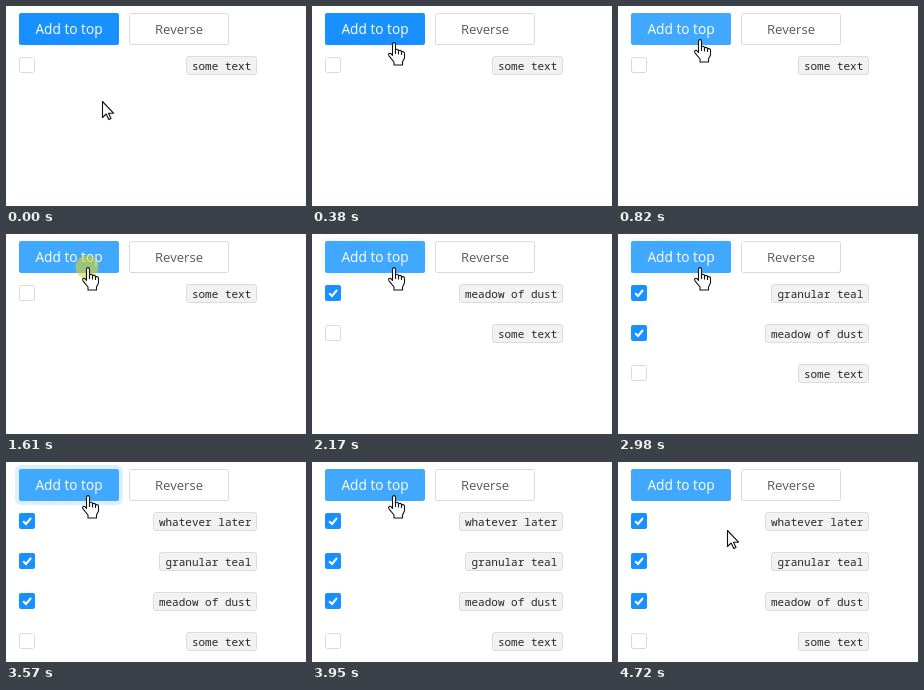
Write an HTML page that moves like this. It is 300 px wide and 200 px high and loops after 4.74 s.

```html
<!DOCTYPE html>
<html lang="en">
<head>
<meta charset="utf-8">
<title>List with add button</title>
<style>
  html, body { margin: 0; width: 100%; height: 100%; overflow: hidden; background: #fff; }
  svg { display: block; width: 100vw; height: 100vh; }
  .label { font-family: "Open Sans", "Noto Sans", sans-serif; text-anchor: middle; }
  .tag { font: 11px "Noto Sans Mono", "DejaVu Sans Mono", monospace; text-anchor: end; fill: #262626; }
  .cursor { fill: #fff; stroke: #111; stroke-width: 1.1; stroke-linejoin: round; }
</style>
</head>
<body>
<svg viewBox="0 0 300 200">
  <rect id="wave" fill="none" stroke="#1890ff"/>
  <rect id="add" x="13" y="7" width="100" height="32" rx="2"/>
  <text class="label" x="63" y="28" font-size="13.7" fill="#fff">Add to top</text>
  <rect x="123.5" y="7.5" width="99" height="31" rx="2" fill="#fff" stroke="#d9d9d9"/>
  <text class="label" x="173" y="28" font-size="13.1" fill="#595959">Reverse</text>
  <g id="rows"></g>
  <circle id="press" cx="81" cy="33" r="11.5" fill="#d7d728" fill-opacity=".6"/>
  <path id="arrow" class="cursor" d="M.5.5V16.5L4.2 13 6.8 18.6 9 17.6 6.5 12.2H11.5Z"/>
  <g id="hand" class="cursor">
    <path d="M4.5 13.5V2.5C4.5 0 7.5 0 7.5 2.5V8.5C7.5 6.8 10.5 6.8 10.5 8.8V9.5C10.5 7.9 13.5 7.9 13.5 9.8V10.5C13.5 9.2 16.5 9.2 16.5 11.2V16L14.5 20V23H6V20L1 13.8C-.3 12 1.8 10.2 3.2 11.8Z"/>
    <path d="M7.5 8V12M10.5 9V12.5M13.5 10V13" fill="none"/>
  </g>
</svg>
<script>
const LOOP = 4740;
const TEXTS = ["some text", "meadow of dust", "granular teal", "whatever later"];
// One entry per click: press, release, ring fully grown, ring faded, remaining ring opacity
const CLICKS = [
  [1610, 1740, 1870, 2170, .04],
  [2480, 2600, 2710, 2980, .04],
  [3390, 3490, 3570, 3950, 0],
];
const $ = id => document.getElementById(id);
const clamp = v => Math.min(1, Math.max(0, v));
const mix = (a, b, p) => a + (b - a) * p;

function set(el, attrs) {
  for (const key in attrs) el.setAttribute(key, attrs[key]);
}

$("rows").innerHTML = TEXTS.map((text, i) => {
  const w = Math.ceil(text.length * 6.6 + 11.5);
  const box = i
    ? `<rect x="13" y="51" width="16" height="16" rx="2" fill="#1890ff"/>
       <path d="M17.2 59.2 20 62 25 56" fill="none" stroke="#fff" stroke-width="2"/>`
    : `<rect x="13.5" y="51.5" width="15" height="15" rx="2" fill="#fff" stroke="#d9d9d9"/>`;
  return `<g>${box}
    <rect x="${251.5 - w}" y="50.5" width="${w - 1}" height="18" rx="2.5" fill="#f2f2f2" stroke="#dcdcdc"/>
    <text class="tag" x="245.3" y="64">${text}</text></g>`;
}).join("");

function drawRows(t) {
  const count = 1 + CLICKS.filter(c => t >= c[1]).length;
  [...$("rows").children].forEach((row, i) => set(row, {
    transform: `translate(0 ${40 * (count - 1 - i)})`,
    visibility: i < count ? "visible" : "hidden",
  }));
}

function drawWave(t) {
  const click = CLICKS.filter(c => t >= c[1]).pop();
  let size = 0, alpha = 0;
  if (click) {
    const [, start, grown, faded, rest] = click;
    const p = clamp((t - start) / (grown - start));
    size = 4 * (1 - (1 - p) ** 2);
    alpha = t < faded ? mix(.4, .14, p) : rest;
  }
  const half = size / 2;
  set($("wave"), {
    x: 13 - half, y: 7 - half, width: 100 + size, height: 32 + size,
    rx: 2 + half, "stroke-width": size, "stroke-opacity": alpha,
  });
}

// Pointer hot spot
function pointer(t) {
  if (t < 640) {
    const p = clamp(t / 380), e = p * p * (3 - 2 * p);
    return [mix(96, 82, e), mix(95, 36, e)];
  }
  if (t < 4600) return [82, mix(36, 33, Math.ceil(clamp((t - 630) / 190) * 3) / 3)];
  const p = clamp(Math.floor((t - 4595) / 25) / 5);
  return [mix(82, 109, p), mix(33, 68, p)];
}

function drawPointer(t) {
  const [x, y] = pointer(t).map(Math.round);
  const over = y < 39;
  set($("hand"), { transform: `translate(${x - 6} ${y})`, visibility: over ? "visible" : "hidden" });
  set($("arrow"), { transform: `translate(${x} ${y})`, visibility: over ? "hidden" : "visible" });
}

function frame(now) {
  const t = now % LOOP;
  $("add").setAttribute("fill", t < 500 ? "#1890ff" : "#40a9ff");
  const pressed = CLICKS.some(c => t >= c[0] && t < c[1]);
  $("press").setAttribute("visibility", pressed ? "visible" : "hidden");
  drawRows(t);
  drawWave(t);
  drawPointer(t);
  requestAnimationFrame(frame);
}

const begin = performance.now();
const tick = window.requestAnimationFrame.bind(window);
tick(() => frame(Math.max(0, performance.now() - begin)));
</script>
</body>
</html>
```
